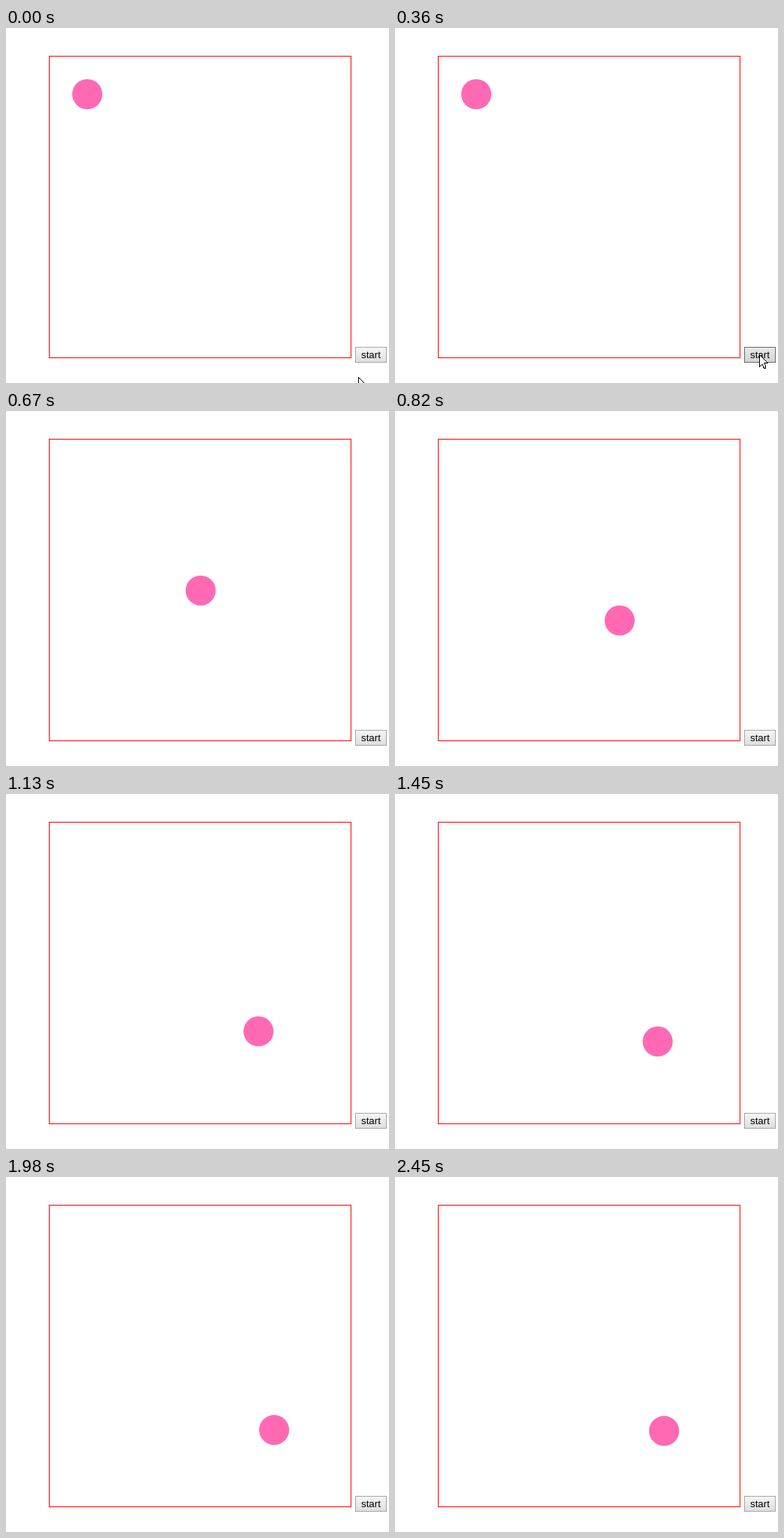
These frames come from a looping animation (509 px wide and 472 px high, 2510 ms). An HTML page:

```html
<!DOCTYPE html>
<html lang="en">
<head>
<meta charset="utf-8">
<title>Easing ball</title>
<style>
  html, body { margin: 0; width: 100%; height: 100%; overflow: hidden; background: #fff; }
  svg { display: block; }
  text { font: 13.333px Arial, "Liberation Sans", sans-serif; }
  #button { stroke: #a6a6a6; }
  #button.hover { stroke: #707070; }
  #button.pressed { filter: brightness(.95); }
</style>
</head>
<body>
<svg width="509" height="472" viewBox="0 0 509 472">
  <defs>
    <linearGradient id="face" x1="0" y1="0" x2="0" y2="1">
      <stop stop-color="#f6f6f6"/>
      <stop stop-color="#ddd" offset="1"/>
    </linearGradient>
  </defs>
  <rect x="57.5" y="37.5" width="401" height="401" fill="none" stroke="#f00"/>
  <circle id="ball" r="20" fill="#ff69b4"/>
  <rect id="button" x="464.5" y="424.5" width="41" height="20" fill="url(#face)"/>
  <text x="472" y="439">start</text>
  <path id="cursor" d="M.5 .5V16.5L4 13L6.5 18.5H8.5L9 17L7 11.5H11.5Z"
        fill="#fff" stroke="#000" shape-rendering="crispEdges"/>
</svg>
<script>
  const LOOP = 2510, STEP = 77, LEAD = 27;   // ms; the picture changes once per step
  const TRAVEL = 250, DECAY = 0.95;          // each tick covers 5% of the way left
  const START_STEP = 5.1, TICKS_PER_STEP = 4.7;
  const PRESS_STEP = 5, LEAVE_STEP = 6;

  const ball = document.getElementById("ball");
  const button = document.getElementById("button");
  const cursor = document.getElementById("cursor");
  const moveTo = (node, x, y) => node.setAttribute("transform", `translate(${x} ${y})`);

  function draw(t) {
    const step = Math.floor((t + LEAD) / STEP);

    const ticks = Math.max(0, Math.round((step - START_STEP) * TICKS_PER_STEP));
    const offset = TRAVEL * (1 - DECAY ** ticks);
    moveTo(ball, 108 + offset, 88 + offset);

    // The pointer slows down onto the button, then speeds away downwards.
    const arrive = 1 - (1 - Math.min(step / 3, 1)) ** 2;
    const leave = Math.max(step - LEAVE_STEP, 0);
    moveTo(cursor, 468 + 16 * arrive + 4 * leave, 464 - 30 * arrive + 16 * leave ** 2);

    button.classList.toggle("hover", step > 0 && leave < 2);
    button.classList.toggle("pressed", step === PRESS_STEP);
  }

  const start = performance.now();
  function frame() {
    draw((performance.now() - start) % LOOP);
    requestAnimationFrame(frame);
  }
  frame();
</script>
</body>
</html>
```
